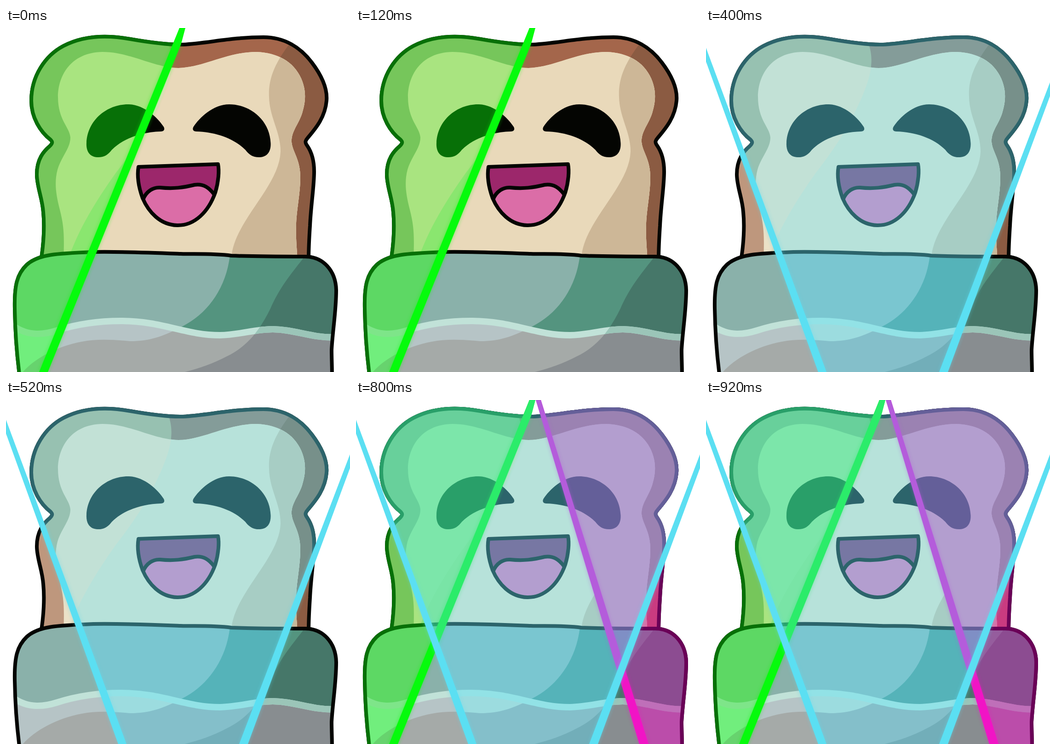
An HTML page that plays this animation: 748 by 748 pixels, repeating every 1000 ms.

```html
<!DOCTYPE html>
<html lang="en">
<head>
<meta charset="utf-8">
<title>Toast light show</title>
<style>
  html, body { margin: 0; width: 100%; height: 100%; overflow: hidden; background: #fff; }
  svg { display: block; width: 100%; height: 100%; }
</style>
</head>
<body>
<svg id="stage" viewBox="0 0 748 748"></svg>
<script>
const shapes = {
  toast: `M76 505C82 470 84 430 81 400C79 370 67 345 67 318C67 285 82 268 95 257C101 251 102 248 97 243
    C75 226 55 195 55 158C55 105 85 60 125 39C165 18 215 14 270 24C310 31 350 37 385 36
    C440 33 490 20 560 20C605 20 640 42 665 75C690 108 699 135 697 158C694 195 672 220 656 239
    C650 246 650 249 655 256C666 272 670 292 670 312C670 345 663 385 661 430C659 460 658 480 658 505Z`,
  bread: `M125 505C127 450 126 430 117 395C108 360 105 335 112 308C120 280 140 262 140 238
    C138 215 113 200 113 150C113 105 140 53 210 52C270 52 320 86 375 87C430 86 480 52 545 52
    C590 54 625 72 642 110C655 140 650 165 644 185C636 210 620 225 621 248
    C623 270 640 285 640 325C640 360 631 400 631 430C630 455 632 475 634 505Z`,
  toastMid: `M352 30C368 72 360 112 318 195C300 232 266 280 238 316C193 380 160 435 138 495V510H760V0H352Z`,
  toastDark: `M620 30C585 75 570 110 572 150C573 195 597 225 597 268C595 345 495 420 490 500V510H760V30Z`,
  blanket: `M30 760C24 715 20 670 19 610C18 560 24 535 45 515C70 492 110 490 190 487
    C260 486 330 489 380 491C410 492 450 490 490 495C540 497 600 497 650 497
    C690 497 717 528 718 570C718 615 710 660 708 700C708 720 709 735 709 760Z`,
  blanketMid: `M488 480C484 560 440 620 385 648C340 672 310 681 270 681C230 677 195 676 165 682
    C110 692 60 720 35 750V760H760V480Z`,
  blanketDark: `M655 490C615 540 595 565 575 610C555 650 530 690 480 714C450 730 420 740 385 749V760H760V490Z`,
  hem: `M16 648C50 672 85 666 110 658C150 645 200 637 250 637C340 637 390 668 465 668
    C510 667 540 655 580 655C630 656 660 673 716 673`,
  eye: `M175 250C177 200 220 166 265 166C300 166 330 195 343 215C346 221 343 225 337 225
    C295 226 255 240 230 265C222 276 212 282 198 281C182 280 174 268 175 250Z`,
  mouth: `M288 302L461 296C464 310 462 335 455 358C440 400 410 430 372 429
    C335 428 310 400 297 370C288 345 285 320 288 302Z`,
  tongue: `M298 373C305 355 320 346 335 347C365 350 385 347 410 341C430 338 442 348 452 361`
};
shapes.lower = shapes.hem + 'V760H16Z';

const plain = {
  ink: '#040502',
  crust: ['#be977d', '#a4664b', '#8b5b42'],
  bread: ['#ebe1c7', '#e9d9ba', '#cdb797'],
  mouth: '#9c276b', tongue: '#db6da7',
  cloth: ['#8ab1aa', '#54947f', '#467769'],
  hem: ['#c1e2d8', '#9bc5b8'],
  lower: ['#b6c4c6', '#a5aaa8', '#888d90']
};
const green = { ...plain,
  ink: '#077007',
  crust: ['#76c65b', '#7bab52', '#7bab52'],
  bread: ['#a9e480', '#8ae66f', '#8ae66f'],
  cloth: ['#5dd864', '#5dd864', '#5dd864'],
  hem: ['#7ee589', '#7ee589'],
  lower: ['#71ee7d', '#67d36e', '#67d36e']
};
const pink = { ...plain,
  ink: '#6a0057',
  crust: ['#ca3b80', '#ca3b80', '#ca3b80'],
  bread: ['#f27ab3', '#f27ab3', '#db6ea7'],
  cloth: ['#955d9d', '#955d9d', '#8c4c91'],
  hem: ['#bf6fb9', '#bf6fb9'],
  lower: ['#bb4daa', '#bb4daa', '#bb4daa']
};
const cyan = {
  ink: '#2c646b',
  crust: ['#97c1b1', '#849c99', '#77908a'],
  bread: ['#c2e1d6', '#b7e2da', '#a7cdc4'],
  mouth: '#7777a3', tongue: '#b39ecf',
  cloth: ['#7ac6d0', '#55b3b9', '#459ba5'],
  hem: ['#92e2e6', '#92e2e6'],
  lower: ['#9cdcdf', '#84bfca', '#72aeb9']
};
const greenCyan = { ...cyan,
  ink: '#299f69',
  crust: ['#68d09b', '#68b586', '#68b586'],
  bread: ['#7ce6aa', '#79e4a6', '#79e4a6'],
  cloth: ['#5cd3a0', '#5cd3a0', '#5cd3a0']
};
const pinkCyan = { ...cyan,
  ink: '#645f99',
  crust: ['#9b82b2', '#9b82b2', '#9b82b2'],
  bread: ['#b39ecf', '#b39ecf', '#b39ecf'],
  cloth: ['#7f8fc5', '#7f8fc5', '#7f8fc5']
};

const beams = {
  green: '377,0 390,0 381,34 91,748 72,748',
  pink: '391,0 402,0 636,748 616,748',
  cyanL: '0,43 262,748 244,748 0,73',
  cyanR: '748,118 748,148 526,748 507,748'
};
const zones = {
  green: '0,0 384,0 81,748 0,748',
  pink: '396,0 748,0 748,748 626,748',
  cyan: '0,0 748,0 748,133 516,748 253,748 0,58'
};

const fill = (id, color) => `<use href="#${id}" fill="${color}"/>`;
const line = (id, color, width = 8) =>
  `<use href="#${id}" fill="none" stroke="${color}" stroke-width="${width}"/>`;
const clip = (id, body) => `<g clip-path="url(#in-${id})">${body}</g>`;
const clipDef = (id, body) => `<clipPath id="in-${id}">${body}</clipPath>`;
const shades = (base, mid, dark, c) => fill(base, c[0]) + clip(base, fill(mid, c[1]) + fill(dark, c[2]));

function toast(p) {
  const eye = fill('eye', p.ink);
  return shades('toast', 'toastMid', 'toastDark', p.crust)
    + shades('bread', 'toastMid', 'toastDark', p.bread)
    + line('toast', p.ink)
    + eye + `<g transform="translate(750.5) scale(-1 1)">${eye}</g>`
    + fill('mouth', p.mouth)
    + clip('mouth', `<path d="${shapes.tongue}V440H298Z" fill="${p.tongue}"/>` + line('tongue', p.ink))
    + line('mouth', p.ink)
    + shades('blanket', 'blanketMid', 'blanketDark', p.cloth)
    + clip('blanket', shades('lower', 'blanketMid', 'blanketDark', p.lower)
      + line('hem', p.hem[0], 14) + clip('blanketDark', line('hem', p.hem[1], 14)))
    + line('blanket', p.ink);
}

const beam = (name, color) => `<polygon points="${beams[name]}" fill="${color}"/>`;
const glow = (name, color) =>
  clip('body', `<g filter="url(#soft)" opacity=".45">${beam(name, color)}</g>`);
const laser = (name, color) => glow(name, color) + beam(name, color);

// One digit per 200 ms step: 1 = lit.
const layer = (steps, body) => `<g data-steps="${steps}">${body}</g>`;

const defs = Object.entries(shapes).map(([id, d]) =>
    `<path id="${id}" d="${d}" stroke-linejoin="round"/>` + clipDef(id, `<path d="${d}"/>`)).join('')
  + Object.entries(zones).map(([id, pts]) =>
    clipDef('zone-' + id, `<polygon points="${pts}"/>`)).join('')
  + clipDef('body', `<path d="${shapes.toast}"/><path d="${shapes.blanket}"/>`)
  + `<filter id="soft" filterUnits="userSpaceOnUse" x="-20" y="-20" width="788" height="788">
      <feGaussianBlur stdDeviation="4"/></filter>`;

const stage = document.getElementById('stage');
stage.innerHTML = `<defs>${defs}</defs>`
  + toast(plain)
  + layer('10011', clip('zone-green', toast(green)) + laser('green', '#06fb0c'))
  + layer('01011', clip('zone-pink', toast(pink)) + laser('pink', '#f114c5'))
  + layer('00101', clip('zone-cyan', toast(cyan)
      + layer('00001', clip('zone-green', toast(greenCyan)) + laser('green', '#2bec6a')
        + clip('zone-pink', toast(pinkCyan)) + laser('pink', '#b45cdb')))
    + laser('cyanL', '#5bdff2') + laser('cyanR', '#5bdff2'));

for (const el of stage.querySelectorAll('[data-steps]')) {
  const steps = [...el.dataset.steps];
  const frames = steps.map((on, i) => ({ opacity: on, offset: i / steps.length, easing: 'step-end' }));
  frames.push({ opacity: steps.at(-1), offset: 1 });
  el.animate(frames, { duration: 1000, iterations: Infinity });
}
</script>
</body>
</html>
```
